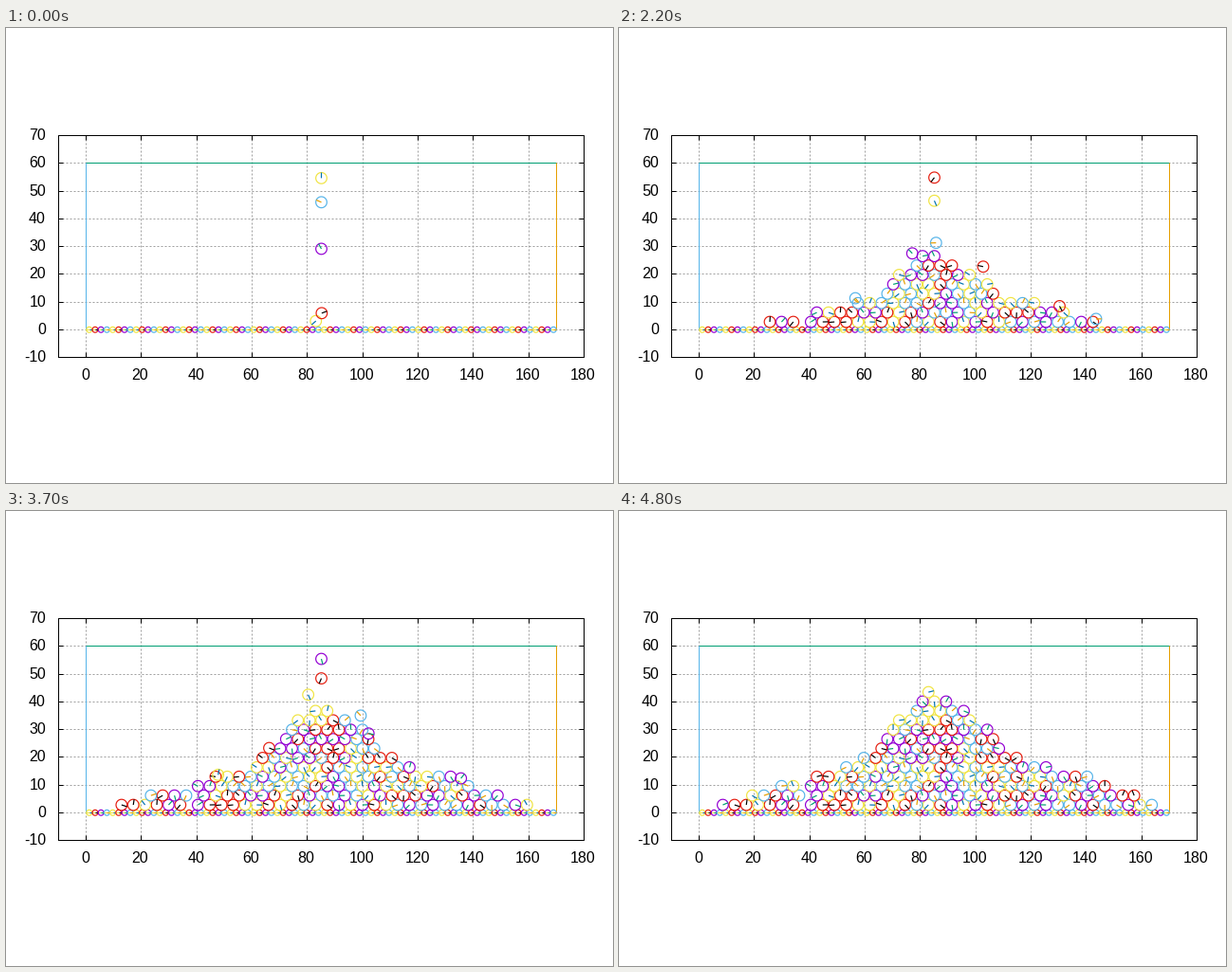
Recreate the animation shown at these times as a matplotlib script. Size 640x480 px, loop 4.9 s.

```python
import numpy as np
import matplotlib.pyplot as plt
from matplotlib.animation import FuncAnimation
from matplotlib.collections import LineCollection

W, H, DPI = 640, 480, 100
PX = 72 / DPI                        # one pixel in points
FRAMES, INTERVAL = 49, 100
BALLS, R = 200, 2.0
DROP_X, DROP_Y, G = 85.0, 56.0, 8.1  # time unit: one drop
STEP, START = 4.589, 4.574
BUMPS = 80
PITCH = 170 / BUMPS
BASE = np.sqrt(9 - (PITCH / 2) ** 2)
LAYER = np.sqrt(4 * R ** 2 - PITCH ** 2)
SEAM = 18                            # column where two packings meet

RIM = ["#f0e442", "#e51e10", "#9400d3", "#56b4e9"]
SPOKE = ["#0072b2", "#000000", "#009e73", "#e69f00"]

# Key points of the finished heap's outline
OUTLINE = np.array([(4, 0), (6, 3.2), (37, 12), (58, 18), (83, 44),
                    (105, 30), (114, 20), (136, 14), (165, 3), (167, 0)])


def heap(x, grown):
    """Height of the heap at x when grown to a share of its final size."""
    u = DROP_X + (x - DROP_X) / (0.5 + 0.5 * grown)
    return grown * np.interp(u, *OUTLINE.T)


def fill_sites():
    """The first packed sites the growing heap reaches, in order."""
    sizes = np.linspace(0.01, 1.3, 1000)
    sites = []
    for k in range(15):
        for j in range(3, BUMPS - 2):
            if j == SEAM or (j + k + (j < SEAM)) % 2 == 0:
                continue
            x, y = j * PITCH, BASE + k * LAYER
            reached = heap(x, sizes) >= y
            if reached.any():
                sites.append((sizes[reached.argmax()], x, y))
    return sorted(sites)[:BALLS]


rng = np.random.default_rng(7)
sites = fill_sites()
rest_angle = rng.uniform(0, 2 * np.pi, BALLS)
spin = rng.uniform(-1.5, 1.5, BALLS)
slack = rng.uniform(0.8, 1.5, BALLS)


def ball_state(i, age):
    """Position and angle of a ball some time after its release."""
    grown, hx, hy = sites[i]
    top = heap(DROP_X, grown) + 3
    hit = np.sqrt(2 * (DROP_Y - top) / G)
    if age < hit:
        x, y = DROP_X, DROP_Y - G * age ** 2 / 2
    else:
        far = abs(hx - DROP_X)
        s = min(1, (age - hit) / (slack[i] + far / 7))
        x = hx + (DROP_X - hx) * (1 - s) ** 1.7
        slope = heap(x, grown) + 3 * (1 - s)
        hop = abs(np.sin(2 * np.pi * s)) * (1 - s) * min(4, far / 8)
        y = (1 - s * s) * slope + s * s * hy + hop
    angle = rest_angle[i] - (x - hx) / R + spin[i] * max(0, hit - age)
    return x, y, angle


LEFT, RIGHT, TOP, BOTTOM = 55.5, 609.5, 113.5, 347.5


def px(x):
    return LEFT + (np.asarray(x) + 10) * (RIGHT - LEFT) / 190


def py(y):
    return BOTTOM - (np.asarray(y) + 10) * (BOTTOM - TOP) / 80


TURN = np.linspace(0, 2 * np.pi, 41)


def disc(x, y, r, angle):
    rim = np.column_stack([px(x + r * np.cos(TURN)), py(y + r * np.sin(TURN))])
    ends = np.array([0, r])
    spoke = np.column_stack([px(x + ends * np.cos(angle)),
                             py(y + ends * np.sin(angle))])
    return [rim, spoke]


def disc_colors(n):
    return [c for i in range(n) for c in (RIM[i % 4], SPOKE[i % 4])]


fig = plt.figure(figsize=(W / DPI, H / DPI), dpi=DPI, facecolor="white")
ax = fig.add_axes([0, 0, 1, 1])
ax.set_xlim(0, W)
ax.set_ylim(H, 0)
ax.axis("off")


def line(xs, ys, color="black", z=3, **kw):
    ax.plot(xs, ys, color=color, lw=PX, zorder=z, snap=False,
            solid_capstyle="butt", **kw)


def center(v):
    """Middle of the pixel, so thin lines stay crisp."""
    return np.floor(v) + 0.5


def draw_axes():
    dots = dict(color="#a0a0a0", z=1, linestyle=(0, (2, 2)),
                dash_capstyle="butt")
    label = dict(family="Liberation Sans", fontsize=16 * PX, va="baseline")
    for v in range(0, 181, 20):
        x = center(px(v))
        if v < 180:
            line([x, x], [BOTTOM, TOP], **dots)
        line([x, x], [BOTTOM, BOTTOM - 5])
        line([x, x], [TOP, TOP + 5])
        ax.text(x - 1, 371, str(v), ha="center", **label)
    for v in range(-10, 71, 10):
        y = center(py(v))
        if -10 < v < 70:
            line([LEFT, RIGHT], [y, y], **dots)
        line([LEFT, LEFT + 5], [y, y])
        line([RIGHT, RIGHT - 5], [y, y])
        ax.text(42, y + 4.5, str(v), ha="right", **label)
    line([LEFT, RIGHT, RIGHT, LEFT, LEFT], [BOTTOM, BOTTOM, TOP, TOP, BOTTOM],
         z=8, solid_joinstyle="miter")


def discs(z):
    group = LineCollection([], linewidths=1.2 * PX, zorder=z)
    ax.add_collection(group, autolim=False)
    return group


def fill(group, states, r):
    group.set_segments([s for x, y, a in states for s in disc(x, y, r, a)])
    group.set_color(disc_colors(len(states)))


def draw_box():
    x0, x1 = center(px([0, 170]))
    y0, y1 = center(py([0, 60]))
    line([x0, x1], [y0, y0], "#f0e442")
    line([x0, x1], [y1, y1], "#009e73")
    line([x0, x0], [y0, y1], "#56b4e9")
    line([x1, x1], [y0, y1], "#e69f00")
    fill(discs(4), [((i + 0.5) * PITCH, 0, 0) for i in range(BUMPS)], 1)


draw_axes()
draw_box()
balls = discs(5)


def update(frame):
    now = START + STEP * frame
    n = min(BALLS, int(now) + 1)
    fill(balls, [ball_state(i, now - i) for i in range(n)], R)
    return [balls]


anim = FuncAnimation(fig, update, frames=FRAMES, interval=INTERVAL,
                     repeat=True, repeat_delay=0, blit=False)
plt.show()
```
